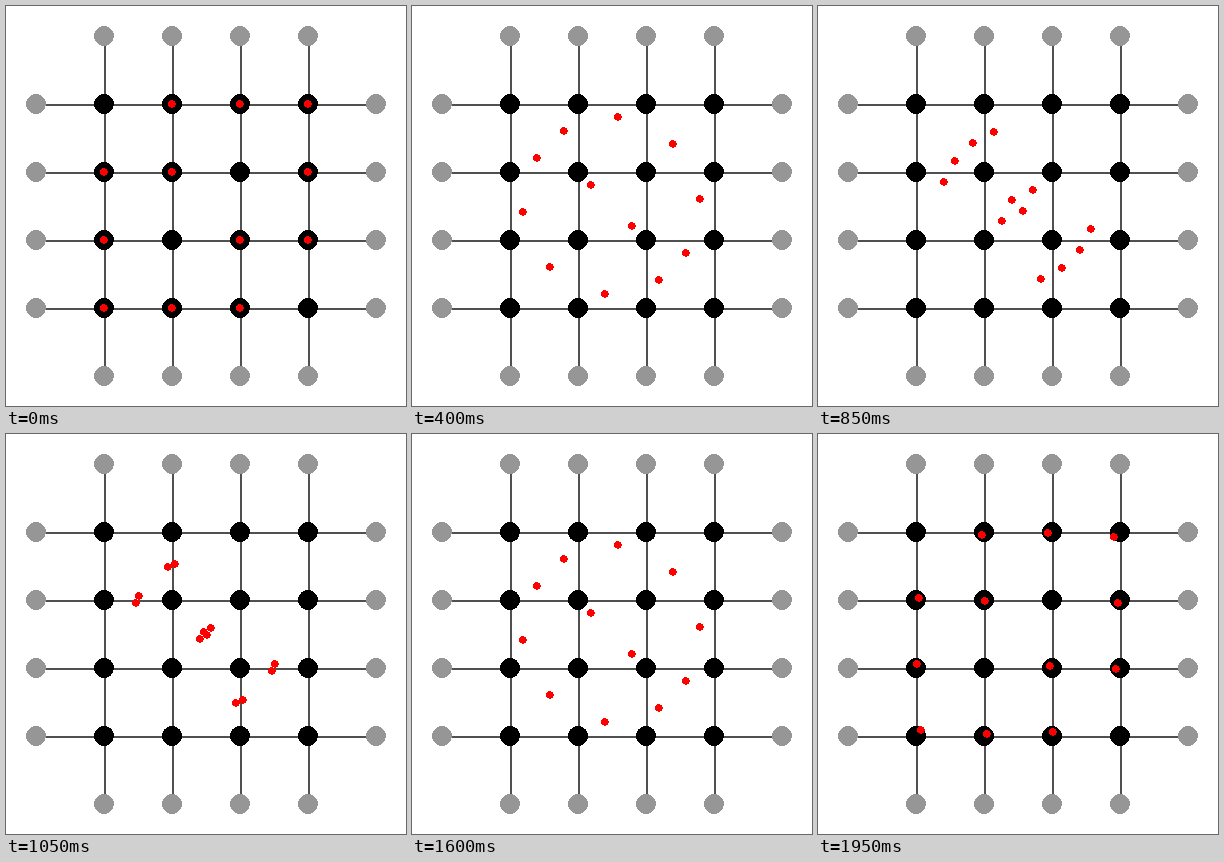
These frames come from a looping animation (400 by 400 pixels, 2 s). An HTML page:

```html
<!DOCTYPE html>
<html lang="en">
<head>
<meta charset="utf-8">
<title>Grid exchange</title>
<style>
html, body { margin: 0; width: 100%; height: 100%; overflow: hidden; background: #fff; }
svg { display: block; width: 100%; height: 100%; }
</style>
</head>
<body>
<svg id="stage" viewBox="0 0 400 400" shape-rendering="crispEdges"></svg>
<script>
const stage = document.getElementById('stage');
const LOOP = 2000, STEP = 50, STEPS = LOOP / STEP;
const at = i => 98 + 68 * i;

function add(tag, attrs) {
  const el = document.createElementNS('http://www.w3.org/2000/svg', tag);
  for (const key in attrs) el.setAttribute(key, attrs[key]);
  return stage.appendChild(el);
}
const disc = (cx, cy, r, fill) => add('circle', { cx, cy, r, fill });
const wire = (x1, y1, x2, y2) => add('line', { x1, y1, x2, y2, stroke: '#505050', 'stroke-width': 2 });

const inner = [0, 1, 2, 3];
for (const i of inner) {
  const p = at(i) + 1;
  wire(p, 30, p, 370);
  wire(30, p, 370, p);
}
for (const i of inner) {
  for (const end of [30, 370]) {
    disc(at(i), end, 10, '#969696');
    disc(end, at(i), 10, '#969696');
  }
  for (const j of inner) disc(at(i), at(j), 10, '#000');
}

// Pairs of [column, row] nodes whose dots trade places in one loop.
const swaps = [
  [[1, 0], [0, 2]],
  [[2, 0], [0, 1]],
  [[3, 0], [0, 3]],
  [[1, 1], [2, 2]],
  [[3, 1], [2, 3]],
  [[3, 2], [1, 3]]
];
const dots = swaps.flatMap(([a, b]) => [[a, b], [b, a]])
  .map(([from, to]) => ({ from, to, el: disc(0, 0, 3.7, '#f00') }));

function draw(ms) {
  const step = Math.floor((ms % LOOP) / STEP);
  const travel = (a, b) => Math.floor(at(a) + (at(b) - at(a)) * step / STEPS);
  for (const { from, to, el } of dots) {
    el.setAttribute('cx', travel(from[0], to[0]));
    el.setAttribute('cy', travel(from[1], to[1]));
  }
}

const start = performance.now();
function tick() {
  draw(performance.now() - start);
  requestAnimationFrame(tick);
}
tick();
</script>
</body>
</html>
```
